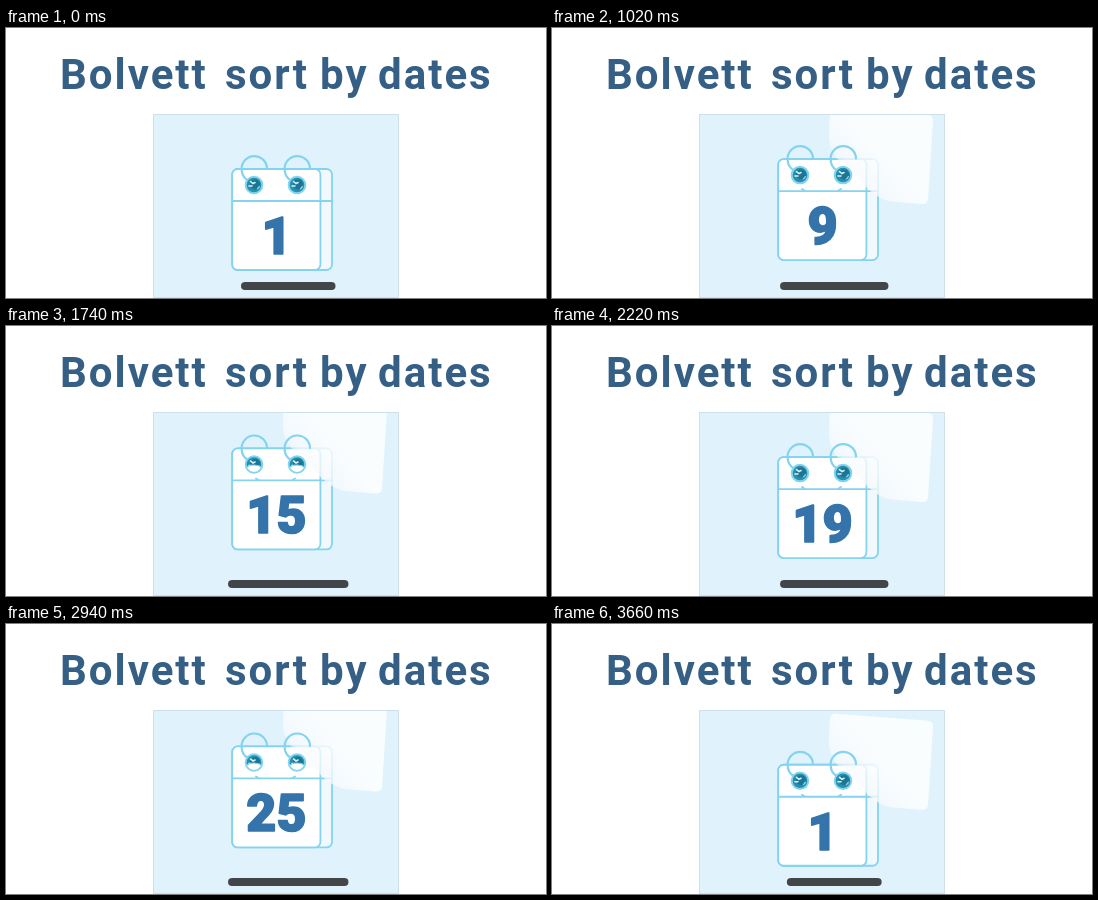
These frames come from a looping animation (540x270 px, 3.7 s). An HTML page:

```html
<!DOCTYPE html>
<html lang="en">
<head>
<meta charset="utf-8">
<title>Sort by dates</title>
<style>
html, body { margin: 0; width: 100%; height: 100%; overflow: hidden; background: #fff; }
svg { display: block; width: 540px; height: 270px; }
.title { font: 700 42px Roboto, sans-serif; letter-spacing: 2px; fill: #355f85; }
.day { font: 900 52px Roboto, sans-serif; fill: #3474aa; stroke: #3474aa; stroke-width: 1.6; stroke-linejoin: round; text-anchor: middle; }
.line { fill: none; stroke: #84d3ef; stroke-width: 1.8; stroke-linecap: round; }
</style>
</head>
<body>
<svg viewBox="0 0 540 270">
  <defs>
    <clipPath id="panel"><rect x="148" y="87" width="244" height="182"/></clipPath>
    <clipPath id="iris"><circle r="7.600"/></clipPath>
    <linearGradient id="sheen" gradientUnits="userSpaceOnUse" x1="294" y1="21" x2="326" y2="-8">
      <stop offset="0" stop-color="#fff" stop-opacity=".15"/>
      <stop offset=".3" stop-color="#f8fafc" stop-opacity=".75"/>
      <stop offset="1" stop-color="#fff" stop-opacity=".85"/>
    </linearGradient>
    <g id="ring">
      <path class="line" style="stroke-width:2.200" d="M-6 11.500C-10.500 9 -12.400 4 -12.400 0A12.700 12.700 0 0 1 13 -.5"/>
      <g transform="translate(0 16)">
        <circle r="8.300" fill="#2590ae" stroke="#84d3ef" stroke-width="2"/>
        <circle cx="1" cy="-.5" r="5" fill="#1b7593"/>
        <path d="M-3.500 -3.500L-1 -1.500L1 -2.500M-5 1H-2" fill="none" stroke="#d9f2fa" stroke-width="1.600" stroke-linecap="round"/>
        <path d="M3 4Q5 3 5.500 1" fill="none" stroke="#9bd7e8" stroke-width="1.200"/>
        <g clip-path="url(#iris)">
          <ellipse class="lid" rx="11" ry="9" cy="18" fill="#fff" stroke="#84d3ef"/>
        </g>
      </g>
    </g>
  </defs>

  <g class="title">
    <text x="54" y="60.500">Bolvett</text>
    <text x="219" y="60.500">sort</text>
    <text x="314" y="60.500">by</text>
    <text x="372" y="60.500">dates</text>
  </g>

  <rect x="147.500" y="86.500" width="245" height="183" fill="#e0f3fd" stroke="#cfe0ea"/>
  <g clip-path="url(#panel)">
    <rect id="shadow" y="254" height="8" rx="4" fill="#424648"/>
    <g id="calendar">
      <rect class="line" x="226.200" width="99.800" height="101" rx="5.500" style="fill:#f1f9fe"/>
      <rect class="line" x="226.200" width="88.200" height="101" rx="5.500" style="fill:#fff"/>
      <path class="line" d="M227 32H326"/>
      <text id="day" class="day" x="270.500" y="85"></text>
      <g id="page">
        <path fill="url(#sheen)" d="M283 -51L376 -44Q381 -43.500 381 -38L376 40Q375.500 45 370 45L339 42.500Q328 41 316 30L290 5Q276 -8 277 -25L278 -46Q278.500 -51 283 -51Z"/>
        <path class="line" d="M250 30L252.500 31.500M289 30L286.500 31.500"/>
      </g>
      <use href="#ring" x="248"/>
      <use href="#ring" x="291"/>
    </g>
  </g>
</svg>
<script>
const $ = id => document.getElementById(id);
const LOOP = 3700, HOLD = 140, STEP = 40;
const JUMP = 30, HEIGHT = 22.2, FLIP = 3, DAYS = 30;
const pagePose = [
  ["", 0],
  ["translate(-14 23) scale(.95)", .9],
  ["", 1]
];
const lid = document.querySelector(".lid");
const start = performance.now();

function draw(now) {
  const t = Math.max(0, now - start) % LOOP;
  const n = t < HOLD ? 0 : 1 + Math.floor((t - HOLD) / STEP);

  const lift = HEIGHT / 2 * (1 - Math.cos(2 * Math.PI * n / JUMP));
  $("calendar").setAttribute("transform", `translate(0 ${141 - lift})`);
  $("shadow").setAttribute("x", 235 - .7 * lift);
  $("shadow").setAttribute("width", 94.5 + 1.4 * lift);

  // Eyes squint near the top of the jump.
  const squint = Math.min(1, Math.max(0, (lift - 11) / 7));
  lid.setAttribute("cy", 18 - 8.5 * squint);

  $("day").textContent = Math.floor((n + 2) / FLIP) % DAYS + 1;
  const [move, alpha] = pagePose[n % FLIP];
  $("page").setAttribute("transform", move);
  $("page").setAttribute("opacity", alpha);

  requestAnimationFrame(draw);
}
draw(start);
</script>
</body>
</html>
```
